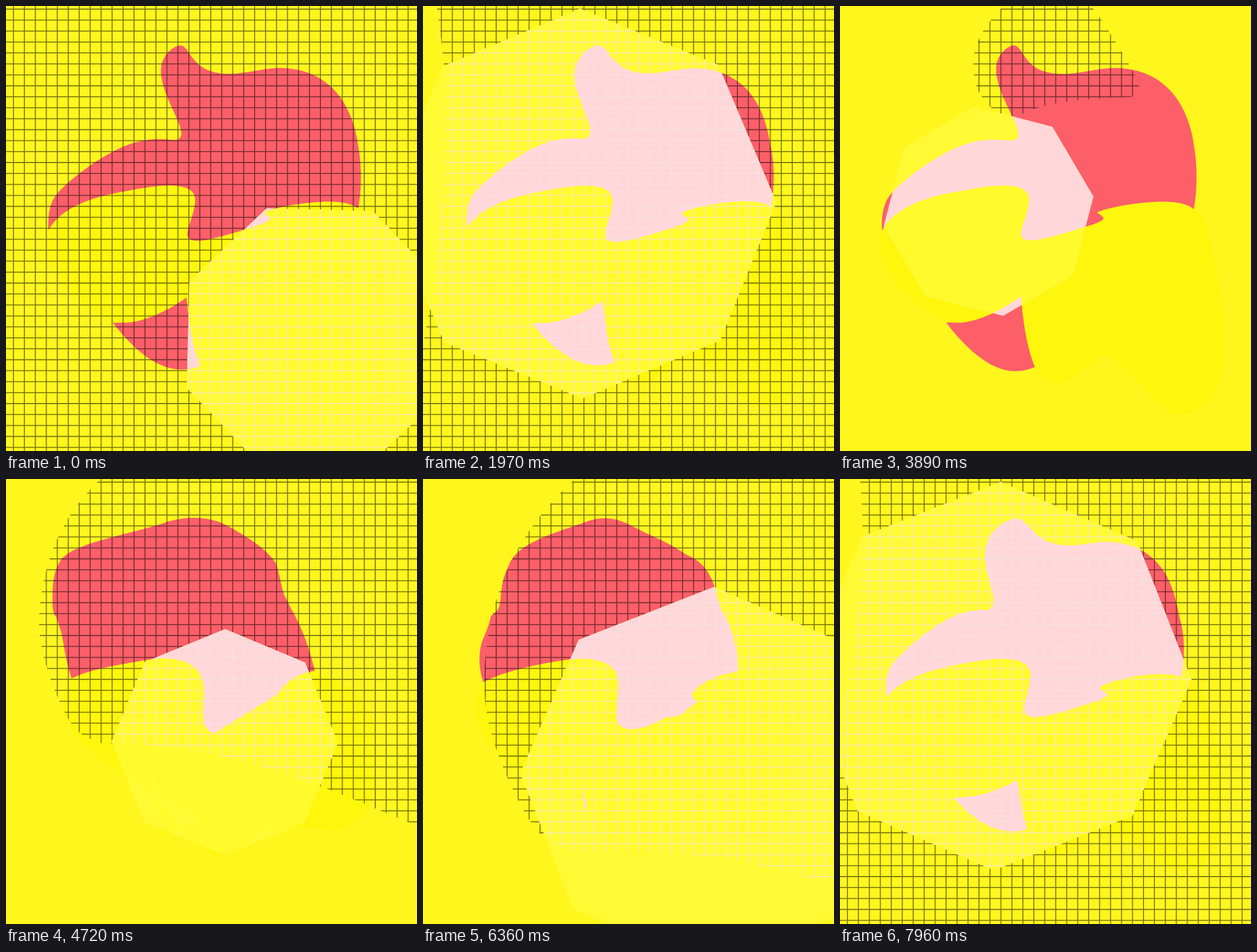
Write an HTML page with a canvas that moves like this. It is 719 by 779 pixels and loops after 8000 ms.

```html
<!DOCTYPE html>
<html lang="en">
<head>
<meta charset="utf-8">
<title>Morphing shapes</title>
<style>
  html, body { margin: 0; width: 100%; height: 100%; overflow: hidden; background: #fff61e; }
  canvas { display: block; }
</style>
</head>
<body>
<canvas id="stage" width="719" height="779"></canvas>
<script>
const W = 719, H = 779, LOOP = 8000, STEP = 19.18, RAD = Math.PI / 180;
const ctx = document.getElementById('stage').getContext('2d');

const plain = { back: '#fff61e', red: '#fd5f69', blob: '#fff60d', grid: 'rgba(0,0,0,.5)' };
const pale = { back: '#fffa33', red: '#ffd7d9', blob: '#fffa2c', grid: 'rgba(245,228,228,.62)' };

// Each shape has three poses: spiky, middle, round.
const redPoses = [
  'M71 398 C70 360 78 340 92 326 C125 293 190 250 235 240 C262 233 285 236 312 238 C328 239 330 232 322 214 C308 182 280 142 278 104 C277 84 292 71 302 69 C314 67 314 97 344 112 C385 130 430 112 478 109 C540 106 590 135 615 195 C622 213 626 228 627 240 C634 285 632 330 627 359 L345 638 C330 645 318 647 306 647 C262 646 215 598 183 553 Z',
  'M87 374 C82 345 86 326 104 306 C130 278 160 252 180 240 C200 230 215 227 224 227 C234 228 238 214 237 200 C236 180 232 162 234 142 C238 100 275 80 298 71 C330 60 338 93 372 107 C405 119 425 114 457 113 C520 115 555 150 568 205 C572 220 574 232 576 240 C587 265 590 300 584 342 L317 598 C308 601 300 602 292 601 C262 600 236 584 214 562 Z',
  'M113 350 C105 325 101 300 99 275 C98 260 95 250 93 240 C92 238 92 236 92 234 C91 230 91 225 91 220 C91 185 93 165 105 145 C125 110 230 95 285 74 C330 62 365 70 395 88 C420 102 452 120 470 145 C482 165 486 185 492 205 C497 214 499 220 502 226 C522 260 534 295 542 336 L258 519 C268 525 278 530 288 540 C300 552 315 570 330 590 Z'
];
const blobPoses = [
  'M71 398 C90 350 160 332 205 325 C240 319 260 314 288 314 C318 315 334 322 329 348 C324 372 318 380 315 395 C313 408 325 409 345 407 C380 400 415 388 432 383 C455 376 460 372 458 368 C456 361 445 362 449 360 C480 350 530 343 570 343 C596 344 612 347 627 359 C640 372 646 388 650 415 C662 470 676 530 675 600 C673 700 630 725 582 727 C550 725 500 612 458 613 C445 613 420 662 376 660 C360 659 350 648 345 638 C328 600 322 550 318 502 C285 530 235 556 200 555 C194 554 188 554 183 553 C130 525 50 460 71 398 Z',
  'M87 374 C120 345 170 332 205 325 C240 318 262 315 285 315 C322 316 338 328 335 352 C333 372 327 390 326 403 C326 418 333 422 348 422 C380 420 430 400 450 394 C472 386 475 382 469 378 C455 371 453 369 466 362 C495 348 530 341 560 341 C570 341 578 342 584 342 C620 345 645 390 650 420 C660 480 665 530 664 590 C660 640 640 668 600 667 C550 665 500 620 458 612 C440 612 410 661 376 660 C345 658 328 630 317 598 C312 580 308 560 306 542 C285 550 260 558 240 560 C230 561 222 562 214 562 C150 535 40 450 87 374 Z',
  'M113 350 C140 337 175 329 205 324 C240 318 260 314 278 314 C325 316 346 335 346 370 C345 385 344 395 344 418 C345 440 360 446 378 444 C402 445 400 430 407 430 C432 434 470 424 494 404 C484 388 470 386 476 374 C488 358 505 345 525 340 C532 338 538 336 542 336 C600 350 640 400 645 430 C650 470 650 510 645 550 C630 610 590 620 560 615 C520 610 490 612 458 612 C440 612 410 661 376 660 C320 655 270 560 258 519 C262 550 270 590 278 618 C290 615 300 610 310 605 C318 600 324 595 330 590 C150 500 60 430 113 350 Z'
];
const maskPoints = [[437, -2], [457, 24], [482, 63], [505, 101], [523, 139], [517, 157], [473, 161],
  [416, 165], [358, 175], [320, 188], [301, 196], [280, 191], [248, 159], [234, 120], [235, 82],
  [251, 43], [281, 5], [318, -30], [370, -45], [410, -32]].map(([x, y]) => [x - 378, y - 75]);

// Rows: time, then values.
const morphKeys = [[0, .09], [715, 1.05], [1230, .4], [1700, -.05], [2685, 1.05], [2950, 1], [3670, -.05],
  [3890, .065], [4655, 1.05], [5640, -.05], [5800, 0], [6625, 1.05], [7060, .55], [7610, -.05], [7960, .26], [8000, .3]];
// x, y, radius, turn
const octagonKeys = [[0, 543, 581, 243, 24], [1230, 387, 410, 433, 94], [2000, 275, 345, 340, 136],
  [2950, 243, 332, 322, 175], [3890, 260, 359, 185, 217], [5800, 543, 581, 243, 339],
  [7060, 406, 408, 437, 388.5], [7960, 275, 345, 340, 451]];
// x, y, scale, turn
const maskKeys = [[0, 500, 420, 8, -40], [1230, 685, 117, 1.55, 10], [2000, 487, 392, 5, 107],
  [2950, 400, 400, 8, 200], [3890, 378, 75, 1, 360], [5800, 815, 433, 6.5, 400],
  [7060, 671, 114, 1.35, 360], [7960, 487, 392, 5, 467]];

// Smooth interpolation that never overshoots its keys.
function track(keys, t) {
  let i = 0;
  while (i < keys.length - 2 && t >= keys[i + 1][0]) i++;
  const a = keys[i], b = keys[i + 1], span = b[0] - a[0];
  const p = Math.min(1, (t - a[0]) / span), q = 1 - p;
  const slope = (k, c) => (keys[k + 1][c] - keys[k][c]) / (keys[k + 1][0] - keys[k][0]);
  const tangent = (k, c) => {
    if (k === 0 || k === keys.length - 1) return 0;
    const l = slope(k - 1, c), r = slope(k, c);
    return l * r <= 0 ? 0 : 2 * l * r / (l + r);
  };
  return a.slice(1).map((v, n) => {
    const c = n + 1;
    return v * q * q * (1 + 2 * p) + b[c] * p * p * (3 - 2 * p)
      + span * p * q * (q * tangent(i, c) - p * tangent(i + 1, c));
  });
}

const numbers = path => path.match(/\d+/g).map(Number);

function morpher(poses) {
  const [a, b, c] = poses.map(numbers), mid = .4;
  return u => {
    const ka = (u - mid) * (u - 1) / mid;
    const kb = u * (u - 1) / (mid * (mid - 1));
    const kc = u * (u - mid) / (1 - mid);
    let i = 0;
    return new Path2D(poses[0].replace(/\d+/g, () => {
      const v = ka * a[i] + kb * b[i] + kc * c[i];
      i++;
      return v.toFixed(2);
    }));
  };
}

function smoothLoop(points) {
  const path = new Path2D(), n = points.length, at = i => points[(i + n) % n];
  path.moveTo(...at(0));
  for (let i = 0; i < n; i++) {
    const [p, a, b, q] = [at(i - 1), at(i), at(i + 1), at(i + 2)];
    path.bezierCurveTo(a[0] + (b[0] - p[0]) / 6, a[1] + (b[1] - p[1]) / 6,
      b[0] - (q[0] - a[0]) / 6, b[1] - (q[1] - a[1]) / 6, b[0], b[1]);
  }
  path.closePath();
  return path;
}

function octagon([x, y, r, turn]) {
  const path = new Path2D();
  for (let i = 0; i < 8; i++) {
    const angle = (turn + i * 45) * RAD;
    path.lineTo(x + r * Math.cos(angle), y + r * Math.sin(angle));
  }
  path.closePath();
  return path;
}

const redAt = morpher(redPoses), blobAt = morpher(blobPoses);
const maskPath = smoothLoop(maskPoints), grid = new Path2D();
for (let x = 13; x < W; x += STEP) { grid.moveTo(x, 0); grid.lineTo(x, H); }
for (let y = 5.5; y < H; y += STEP) { grid.moveTo(0, y); grid.lineTo(W, y); }

function paint(colors, red, blob, [x, y, scale, turn]) {
  ctx.fillStyle = colors.back;
  ctx.fillRect(0, 0, W, H);
  ctx.fillStyle = colors.red;
  ctx.fill(red);
  ctx.fillStyle = colors.blob;
  ctx.fill(blob);
  ctx.save();
  ctx.translate(x, y);
  ctx.rotate(turn * RAD);
  ctx.scale(scale, scale);
  ctx.clip(maskPath);
  ctx.setTransform(1, 0, 0, 1, 0, 0);
  ctx.strokeStyle = colors.grid;
  ctx.lineWidth = 1.8;
  ctx.stroke(grid);
  ctx.restore();
}

function draw(t) {
  const [u] = track(morphKeys, t);
  const red = redAt(u), blob = blobAt(u), mask = track(maskKeys, t);
  paint(plain, red, blob, mask);
  ctx.save();
  ctx.clip(octagon(track(octagonKeys, t)));
  paint(pale, red, blob, mask);
  ctx.restore();
}

const start = performance.now();
function tick() {
  draw((performance.now() - start) % LOOP);
  requestAnimationFrame(tick);
}
tick();
</script>
</body>
</html>
```
